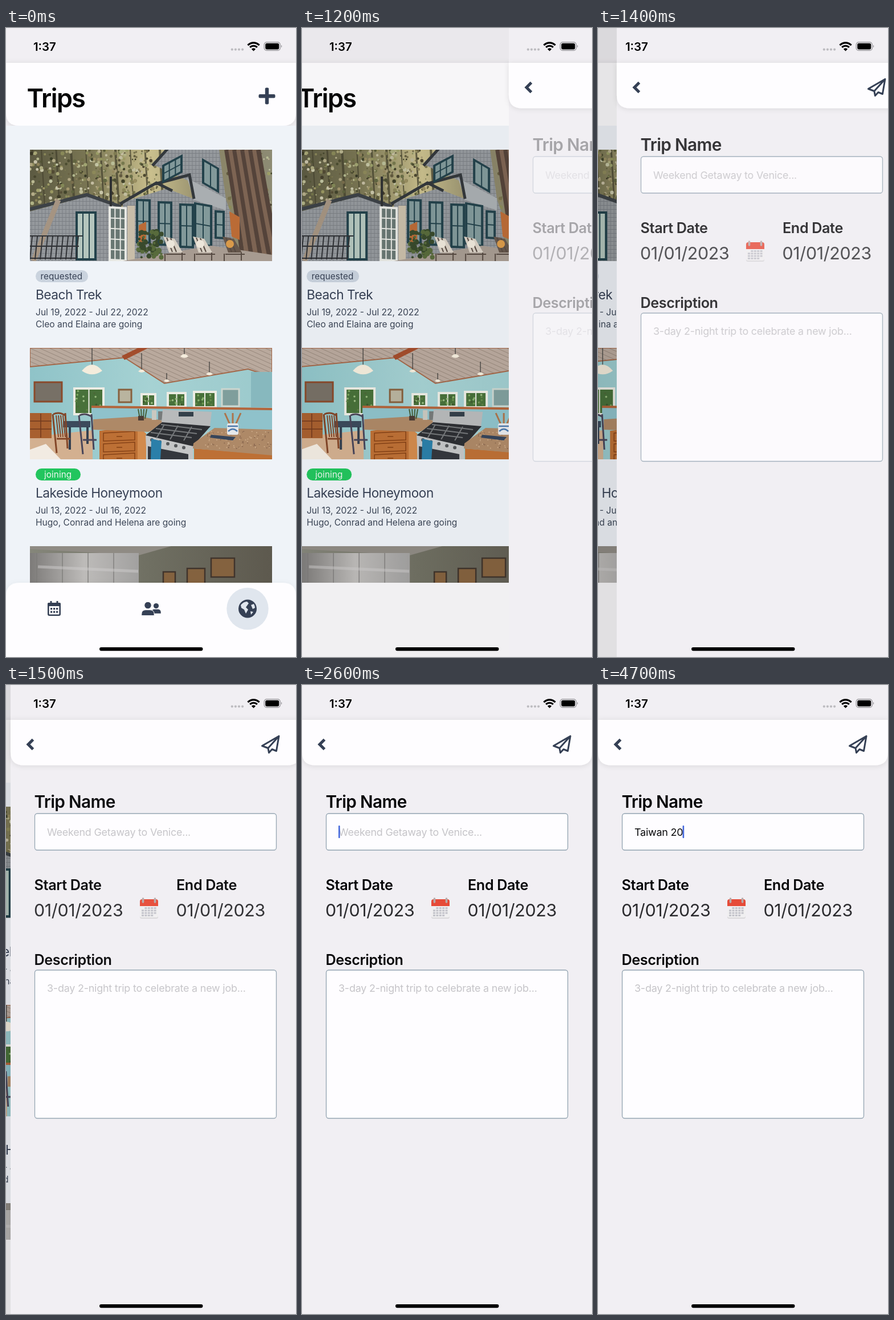
Recreate the animation shown at these times as an HTML page. Size 509x1101 px, loop 5100 ms.

```html
<!DOCTYPE html>
<html lang="en">
<head>
<meta charset="utf-8">
<title>Trips</title>
<style>
html, body { margin: 0; width: 100%; height: 100%; overflow: hidden; background: #f1eff3; }
svg { display: block; width: 100vw; height: 100vh; }
text { font-family: Inter, "Liberation Sans", sans-serif; font-optical-sizing: none; white-space: pre; }
</style>
</head>
<body>
<svg id="stage" viewBox="0 0 509 1101" preserveAspectRatio="none"></svg>
<script>
const W = 509, H = 1101, LOOP = 5100;
const INK = '#354055', BG = '#f1eff3', WHITE = '#fefdff', HINT_INK = '#c5c4c8';
const ROUND = 'stroke-linejoin="round" stroke-linecap="round"';

const rect = (x, y, w, h, fill, more = '') =>
  `<rect x="${x}" y="${y}" width="${w}" height="${h}" fill="${fill}" ${more}/>`;
const disc = (x, y, r, fill) => `<circle cx="${x}" cy="${y}" r="${r}" fill="${fill}"/>`;
const shape = (d, fill, more = '') => `<path d="${d}" fill="${fill}" ${more}/>`;
const line = (d, stroke, w = 1, more = '') => shape(d, 'none', `stroke="${stroke}" stroke-width="${w}" ${more}`);
const text = (x, y, size, str, fill, gap = 0, weight = 400, more = '') =>
  `<text x="${x}" y="${y}" font-size="${size}" fill="${fill}" letter-spacing="${gap}em" font-weight="${weight}" ${more}>${str}</text>`;
const many = (n, f) => Array.from({ length: n }, (_, i) => f(i)).join('');
const clamp = (v, lo, hi) => Math.min(hi, Math.max(lo, v));

function random(seed) {
  return () => (seed = (seed * 16807) % 2147483647) / 2147483647;
}

const blend = (id, colors, down) => `<linearGradient id="${id}" x2="${down ? 0 : 1}" y2="${down ? 1 : 0}">`
  + colors.map((c, i) => `<stop offset="${i / (colors.length - 1)}" stop-color="${c}"/>`).join('') + '</linearGradient>';

const shadow = (id, opacity) => `<filter id="${id}" x="-10%" y="-40%" width="120%" height="180%">
  <feDropShadow dx="0" dy="1" stdDeviation="5" flood-opacity="${opacity}"/></filter>`;

const defs = `<defs>${shadow('soft', .11)}${shadow('faint', .05)}
  ${blend('woods', ['#5c5a42', '#7b7754', '#c9bf8d', '#8a8466', '#8d8b74'])}
  ${blend('wall', ['#8fc3c8', '#a6d2d3', '#9bc9cc'])}
  ${blend('blind', ['#7d7b79', '#bdbbb9', '#a2a1a0'])}
  ${blend('room', ['#85867a', '#6f6f62', '#5d594e'])}
  <pattern id="shingle" width="12" height="7" patternUnits="userSpaceOnUse">
    <path d="M0 6.5H12M3 0V6M9 0V6" stroke="#5d6268" stroke-width=".8" opacity=".6"/>
  </pattern>
  <pattern id="plank" width="9" height="7" patternUnits="userSpaceOnUse" patternTransform="rotate(24)">
    <path d="M0 .5H9" stroke="#847469" opacity=".6"/>
  </pattern>
</defs>`;

// A nested svg clips each picture; inside it the corner is 0,0.
const photo = (y, h, art) => `<svg x="42" y="${y}" width="425" height="${h}">${art}</svg>`;

function pane(x, y, w, h, cols, rows, tilt, frame, glass) {
  return `<g transform="translate(${x} ${y}) skewY(${tilt})">${rect(0, 0, w, h, glass, `stroke="${frame}" stroke-width="4"`)}`
    + many(cols - 1, i => line(`M${w * (i + 1) / cols} 0v${h}`, frame, 2))
    + many(rows - 1, i => line(`M0 ${h * (i + 1) / rows}h${w}`, frame, 2)) + '</g>';
}

function cabin() {
  const rnd = random(71), teal = '#23424b', glass = '#82999a';
  const shingled = d => shape(d, '#95999d') + shape(d, 'url(#shingle)');
  const leaf = (x, w, h) => disc(x + rnd() * w, rnd() * h, 1 + rnd() * 2.4, `hsl(${44 + rnd() * 24},22%,${18 + rnd() * 56}%)`);
  const chair = i => `<g transform="translate(${234 + i * 52} 152)">`
    + shape('M0 0l20 4l14 24H10z', i < 2 ? '#d8d0c4' : '#66574c')
    + line('M6 2l10 25M13 3l10 24M3 30v14M33 28v14M5 31h34', '#564a42', 2) + disc(13, 13, 7, i < 2 ? '#ece6da' : '#d99a4a') + '</g>';
  return rect(0, 0, 425, 195, 'url(#woods)')
    + many(9, i => line(`M${20 + i * 26} 0l6 100`, '#45422f', 2 + i % 3, 'opacity=".75"'))
    + many(420, () => leaf(0, 225, 100)) + many(80, () => leaf(345, 80, 150))
    + many(9, i => line(`M${345 + i * 7} 0Q${365 + i * 7} 120 ${375 + i * 8} 200`, i % 2 ? '#7d6453' : '#54433a', 8))
    + shingled('M0 108L100 82L158 100V195H0z') + line('M0 104L100 79L160 100', '#3d4247', 6)
    + line('M50 88L6 195', '#a59482', 9) + line('M142 47V102', '#2e3031', 4)
    + pane(82, 110, 33, 82, 3, 1, 0, teal, '#b4c5bd')
    + line('M0 151H92M0 169H86M0 190H80' + many(10, i => `M${4 + i * 9} 152l-4 40`), '#303236', 2)
    + shingled('M163 92L240 68L350 110V195H163z')
    + shingled('M218 27L240 0H332L344 87L356 120V160L286 112V58z')
    + shape('M276 50L344 85V106L288 88z', '#a9aeb1')
    + line('M158 95L222 58L250 72M215 28L242 -2M220 60L280 44L288 86', '#33383c', 5)
    + pane(234, 28, 32, 28, 3, 2, -28, teal, glass) + pane(304, 18, 26, 40, 2, 1, 30, teal, glass)
    + pane(140, 101, 28, 92, 3, 5, 3, '#e7e8e3', '#697773') + rect(171, 98, 13, 95, '#c8bda9')
    + many(3, i => pane(188 + i * 38, 88 + i * 4, 22, 74, 2, 2, 2, teal, glass))
    + pane(290, 94, 28, 70, 2, 2, 10, teal, glass) + pane(326, 108, 14, 46, 1, 2, 4, teal, glass)
    + shape('M191 132l13 -6v36h-13zM350 108l18 10v40l-14 -6z', '#ba6b36')
    + shape('M163 195L318 168L425 184V195z', '#a79b91')
    + many(70, () => disc(190 + rnd() * 42, 143 + rnd() * 46, 2 + rnd() * 3, rnd() > .5 ? '#586b3c' : '#394a2c'))
    + many(3, chair);
}

function kitchen() {
  const rnd = random(19), oak = '#bd7035', dark = '#854116';
  const ceiling = 'M0 0H425V51L383 37L236 62L166 17L0 33z';
  const view = (x, y, w, h) => pane(x, y, w, h, 2, 1, 0, '#ecece4', '#48713a')
    + many(14, () => disc(x + 3 + rnd() * (w - 6), y + 4 + rnd() * (h - 8), 1.8, `hsl(95,30%,${25 + rnd() * 40}%)`));
  const frame = (x, y, w, h, c, art) => rect(x, y, w, h, art, `stroke="${c}" stroke-width="3"`);
  const lamp = (x, y, r, drop) => line(`M${x} ${y - drop}V${y}`, '#4a4845', 1.4)
    + shape(`M${x - r} ${y}Q${x} ${y - r * 1.2} ${x + r} ${y}Q${x} ${y + r * .7} ${x - r} ${y}`, '#f4ecdc');
  const granite = d => shape(d, '#ae8967');
  return rect(0, 0, 425, 195, 'url(#wall)')
    + shape(ceiling, '#b9a99d') + shape(ceiling, 'url(#plank)')
    + line(ceiling, '#a3684a', 2) + shape('M161 14L190 0H208L166 21z', '#a34d2c')
    + rect(388, 42, 37, 62, '#87b8be')
    + frame(8, 60, 48, 34, '#8a4a2b', '#777066') + frame(156, 73, 22, 22, '#87613e', '#b9b49f') + frame(337, 72, 30, 30, '#ccd6cf', '#7f9e9c')
    + view(78, 71, 51, 45) + many(3, i => view(196 + i * 46, 81 - i * 2, 24 + i * 7, 21 + i * 3))
    + lamp(109, 40, 18, 40) + lamp(196, 41, 6, 32) + lamp(240, 58, 5, 14) + lamp(271, 15, 7, 15) + lamp(315, 46, 6, 22)
    + shape('M108 105H425V152L108 130z', '#8fc2cb') + line('M108 103L425 107', '#b3653b', 4)
    + shape('M0 156L110 144V195H0z', '#d3b090') + shape('M0 178L28 168L54 195H0z', '#f2ebe2')
    + rect(0, 114, 38, 44, '#a8602f') + line('M0 128H38M0 142H38M19 115V157', '#70391d', 1.5)
    + rect(58, 128, 48, 11, '#3c4a5c') + line('M70 138V178M101 138V168', '#344050', 4)
    + many(2, i => line(`M${40 + i * 46} ${116 + i * 2}l7 68m15 -70l4 62m-25 -60q11 -5 22 3m-16 40h24`, i ? '#49465a' : '#834628', 3))
    + many(4, i => line(`M${46 + i * 4} 118l4 38`, '#834628', 2))
    + shape('M122 145L189 138L204 150V195H122z', oak) + shape('M189 139L204 150V195H189z', '#d28b4d')
    + many(3, i => line(`M129 ${149 + i * 19}l55 -3v15l-55 2zM152 ${155 + i * 19}h10`, dark, 1.5))
    + granite('M111 125L193 120L250 130L208 147L111 143z')
    + many(4, i => line(`M${193 + i * 3} 124l${i * 2 - 3} -17`, '#47613a', 2)) + rect(190, 119, 10, 8, '#4a3c35')
    + rect(214, 109, 8, 17, '#c9c8c0') + rect(225, 111, 9, 15, '#777a7a')
    + shape('M233 108L319 112L316 138L231 131z', '#b8babb') + rect(261, 112, 26, 8, '#34404a')
    + shape('M203 153L232 130L317 137L286 174V195H205z', '#c4c6c7') + shape('M203 153L232 130L317 137L286 172z', '#2d2f33')
    + many(3, i => line(`M${212 + i * 9} ${148 - i * 7}l72 9M${236 + i * 24} ${134 + i * 2}l-14 24`, '#777a7c', 2))
    + shape('M207 172L278 186V195H207z', '#34383e') + many(5, i => disc(214 + i * 14, 161 + i * 3.4, 3, '#56595c'))
    + shape('M213 159l18 4l-2 32h-17z', '#2b7fa9')
    + shape('M288 176L425 187V195H288z', oak) + granite('M287 167L324 140L425 143V188L286 176z')
    + many(110, () => disc(308 + rnd() * 115, 146 + rnd() * 30, 1, rnd() > .5 ? '#8a6850' : '#cfae8c'))
    + shape('M318 152l43 4l-5 6l-40 -5z', '#37455a')
    + many(3, i => line(`M${351 + i * 5} 134l${i * 9 - 9} -20`, '#ad744b', 3))
    + rect(346, 132, 20, 20, '#e6e8ea', 'rx="3"') + line('M347 137h18M348 146q8 -8 16 0', '#4c79ac', 2.5);
}

const lounge = () => rect(0, 0, 425, 64, 'url(#room)')
  + shape('M0 0H248L191 16L0 5z', '#8f8b84')
  + rect(0, 12, 191, 52, 'url(#blind)') + many(4, i => line(`M${12 + i * 45} 12V64`, '#7c7b79', 1.3))
  + line('M14 36L190 44', '#cfcecd', 5, 'opacity=".5"')
  + many(3, i => rect(234 + i * 42, 45 - i * i * 6, 21 + i * 10, 21 + i * 6, '#84623f', 'stroke="#40342c" stroke-width="2.5"'));

function card(y, status, pillW, fill, ink, inset, title, dates, who) {
  return rect(52, y + 211, pillW, 21, fill, 'rx="10.5"')
    + text(inset, y + 227, 15.3, status, ink, .005)
    + text(52, y + 261.5, 22.7, title, '#374155', -.022)
    + text(52, y + 290, 15.6, dates, '#3b4556')
    + text(52, y + 311, 15.6, who, '#3b4556');
}

const person = (x, y, r) => disc(x, y, r, INK)
  + shape(`M${x - r * 1.8} ${y + r * 2.9}v-${r * .4}q0 -${r * 1.2} ${r * 1.2} -${r * 1.2}h${r * 1.2}q${r * 1.2} 0 ${r * 1.2} ${r * 1.2}v${r * .4}z`, INK);
const tabs = '<g id="tabs">'
  + shape('M0 1101V995Q0 971 24 971H485Q509 971 509 995V1101z', WHITE, 'filter="url(#faint)"')
  + rect(74.3, 1007.3, 20.4, 20.4, 'none', `rx="2" stroke="${INK}" stroke-width="2.6"`)
  + rect(73, 1006, 23, 6, INK, 'rx="2"') + line('M79 1003V1009M90 1003V1009', INK, 3)
  + many(6, i => rect(78 + i % 3 * 5, 1015 + Math.floor(i / 3) * 5.5, 3.2, 3.2, INK))
  + person(263.5, 1011.5, 4.6) + `<g stroke="${WHITE}" stroke-width="1">${person(249, 1010.5, 6.2)}</g>`
  + disc(424, 1016.5, 36.7, '#e0e6ee') + disc(424, 1016.5, 16, INK)
  + shape('M412 1010q5 -6 11 -6l3 3l-5 7l4 4l-4 7l-3 -7l-5 -3zM430 1010l5 -2q2 4 2 7l-4 2zM429 1021l5 1l-4 5z', '#e0e6ee') + '</g>';

const header = bottom => shape(`M0 61H509V${bottom - 23}q0 23 -23 23H23q-23 0 -23 -23z`, WHITE, 'filter="url(#soft)"');

const home = `<g id="home">${rect(0, 0, W, H, BG)}${header(171)}`
  + text(36.5, 139, 44.8, 'Trips', '#050506', -.033, 600)
  + `<g id="plus">${rect(443.5, 116, 29, 6.4, INK, 'rx="2"')}${rect(454.8, 104.5, 6.4, 29, INK, 'rx="2"')}</g>`
  + rect(0, 171, W, 800, '#eff3f8') + rect(0, 971, W, 130, '#eff3f8', 'id="under"')
  + photo(213, 195, cabin()) + photo(560, 195, kitchen()) + photo(907, 64, lounge())
  + card(213, 'requested', 92, '#cad3de', '#374155', 60.5, 'Beach Trek', 'Jul 19, 2022 - Jul 22, 2022', 'Cleo and Elaina are going')
  + card(560, 'joining', 79, '#22c55e', '#f1f8f3', 67, 'Lakeside Honeymoon', 'Jul 13, 2022 - Jul 16, 2022', 'Hugo, Conrad and Helena are going')
  + tabs + rect(0, 0, W, H, '#000', 'id="dim"') + '</g>';

const field = (y, h) => rect(42.5, y, 424, h, WHITE, 'rx="4.5" stroke="#93a4b1" stroke-width="1.3"');
const label = (x, y, s, size = 25.2, gap = -.015) => text(x, y, size, s, '#060608', gap, 600);
const date = x => text(x, 405, 30.4, '01/01/2023', '#2b2b2e', -.012);
const calendar = rect(227, 376, 32, 33, '#d9d8da', 'rx="3"') + rect(227, 376, 32, 31, '#f0eff0', 'rx="3"')
  + shape('M227 387V379q0 -4 4 -4h24q4 0 4 4v8z', '#e64b38')
  + many(18, i => rect(230 + (i + 1) % 5 * 5.4, 389 + Math.floor((i + 1) / 5) * 4.3, 4, 3, '#c3c3ca'))
  + line('M232.5 374V380M253.5 374V380', '#b9aaa9', 3.6, ROUND);

const form = `<g id="form">${rect(0, 0, W, H, BG)}${header(140.5)}`
  + line('M39.5 95.5L31 104L39.5 112.5', INK, 5)
  + line('M471 89.5L441.5 106.5L452 110.5L453.5 118.5L459 112.5L466.5 115.5zL452 110.5', INK, 3, ROUND)
  + '<g id="fields">' + label(41.5, 215, 'Trip Name', 29.8, -.022) + field(225, 64)
  + text(64, 263.5, 17.9, '', HINT_INK, -.011, 400, 'id="name"') + rect(64, 246, 2.6, 22, '#4468dc', 'id="caret" rx="1"')
  + label(41.5, 359, 'Start Date') + label(291, 359, 'End Date') + date(41) + date(290.5)
  + calendar + label(41.5, 489.5, 'Description') + field(499, 259.5)
  + text(64, 537, 17.9, '3-day 2-night trip to celebrate a new job...', HINT_INK, -.011) + '</g></g>';

const arc = (r, w) => line(`M${434.5 - r * .72} ${40 - r * .7}A${r} ${r} 0 0 1 ${434.5 + r * .72} ${40 - r * .7}`, '#000', w);
const chrome = text(48, 40, 20.4, '1:37', '#000', 0, 600)
  + many(4, i => disc(396.8 + i * 6.1, 37.6, 2.1, '#bdbcc0'))
  + arc(14, 3.2) + arc(8.8, 3) + shape('M434.5 40.5l-3.7 -3.8q3.7 -3 7.4 0z', '#000')
  + rect(453.2, 24.8, 28, 14.6, 'none', 'rx="4.4" stroke="#8d8c90" stroke-width="1.2"')
  + rect(455.2, 26.8, 24, 10.6, '#000', 'rx="2.6"') + shape('M483 29.5q2.5 2.5 0 5z', '#8d8c90')
  + rect(164, 1084, 181.5, 6.2, '#000', 'rx="3.1"');

const stage = document.getElementById('stage');
stage.innerHTML = defs + home + form + chrome;
const part = id => document.getElementById(id);
const set = (id, key, value) => part(id).setAttribute(key, value);

const HINT = 'Weekend Getaway to Venice...';
const WORDS = 'Taiwan 20';

// One letter per tick for the word, then slower for the digits.
function typedCount(t) {
  return t < 3900 ? clamp(Math.floor((t - 3100) / 100), 0, 6) : 7 + Math.floor((t - 3900) / 150);
}

// The screen refreshes ten times a second.
function draw(ms) {
  const t = Math.floor(ms / 100) * 100;
  const u = Math.max(0, t - 1137) * .01685;
  const rest = t >= 1700 ? 0 : (1 + u) * Math.exp(-u);
  const pushing = t >= 1200;

  set('home', 'transform', `translate(${-.3 * W * (1 - rest)})`);
  set('form', 'transform', `translate(${W * rest})`);
  set('form', 'visibility', pushing ? 'visible' : 'hidden');
  set('tabs', 'visibility', pushing ? 'hidden' : 'inherit');
  set('under', 'fill', pushing ? '#f8f7f9' : '#eff3f8');
  set('dim', 'opacity', .1 * (1 - rest));
  set('plus', 'opacity', t >= 1100 ? .8 : 1);
  set('fields', 'opacity', 1 - Math.pow(1 - clamp((t - 1100) / 450, 0, 1), 1.5));

  const value = WORDS.slice(0, typedCount(t));
  const name = part('name');
  name.textContent = value || HINT;
  name.setAttribute('fill', value ? '#08080a' : HINT_INK);
  set('caret', 'x', 64 + (value ? name.getComputedTextLength() - .8 : 0));
  set('caret', 'opacity', t >= 2600 ? 1 : 0);
}

const start = performance.now();
function tick() {
  draw((performance.now() - start) % LOOP);
  requestAnimationFrame(tick);
}
tick();
</script>
</body>
</html>
```
